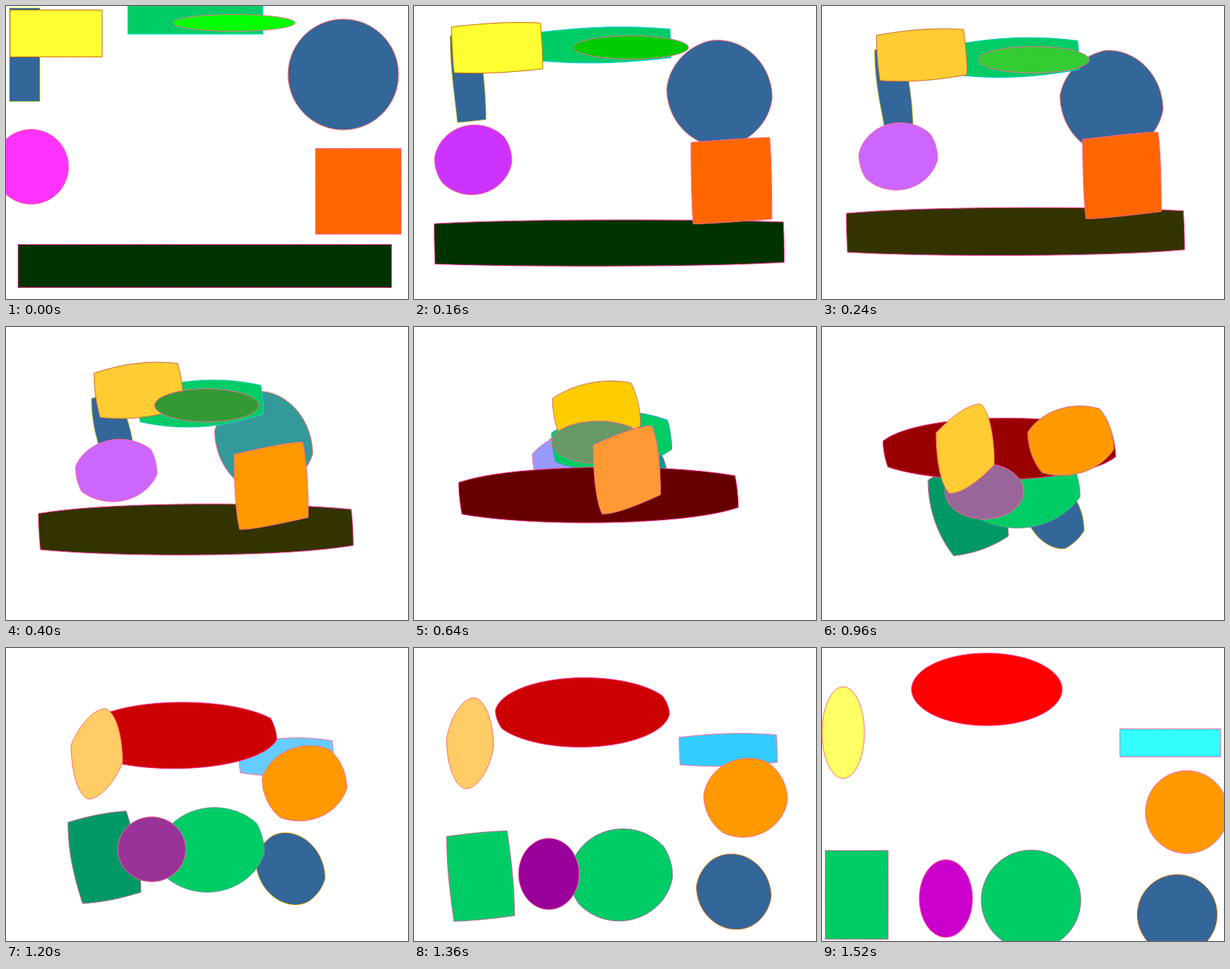
These frames come from a looping animation (550x400 px, 1.6 s). An HTML page with a canvas:

```html
<!DOCTYPE html>
<html lang="en">
<head>
<meta charset="utf-8">
<title>Shape morph</title>
<style>
  html, body { margin: 0; width: 100%; height: 100%; overflow: hidden; background: #fff; }
  canvas { display: block; }
</style>
</head>
<body>
<canvas id="stage" width="550" height="400"></canvas>
<script>
const ctx = document.getElementById('stage').getContext('2d');
const STEPS = 20, STEP_MS = 80, SIDE_POINTS = 40;

const rect = (cx, cy, rx, ry) => ({ cx, cy, rx, ry, isRect: true });
const oval = (cx, cy, rx, ry = rx) => ({ cx, cy, rx, ry });
const lerp = (a, b, t) => a + (b - a) * t;
const mix = (p, q, t) => [lerp(p[0], q[0], t), lerp(p[1], q[1], t)];

// Back to front: start, end, arc in degrees matched to a rectangle's right side,
// then fill and stroke colours at both ends.
const shapes = [
  [oval(461.5, 93.5, 75.5), rect(47.5, 337, 43, 60.5), 105, '369', '0c6', 'f66', 'c69'],
  [rect(25.5, 66.5, 21, 64), oval(486, 364, 54.5), 135, '369', '369', 'cf3', 'c60'],
  [oval(34.5, 219.5, 51), rect(476.5, 129.5, 69, 19), 39, 'f3f', '3ff', 'f69', 'f69'],
  [rect(259, 19, 92.5, 19.5), oval(286, 344, 68), 37, '0c6', '0c6', '0ff', '969'],
  [rect(272, 355, 255.5, 29.5), oval(225.5, 56.5, 103, 49.5), 26, '030', 'f00', 'f39', 'f39'],
  [rect(68.5, 37.5, 63, 32), oval(499, 224, 56.5), 63, 'ff3', 'f90', 'c60', 'f6c'],
  [oval(312, 23, 83.5, 11.5), oval(169.5, 342, 36.5, 53), 90, '0f0', 'c0c', 'f69', 'f69'],
  [rect(482, 253, 58.5, 58.5), oval(29, 115.5, 29, 62.5), 90, 'f60', 'ff6', 'f69', 'f66']
].map(([from, to, arc, ...colors]) => ({ points: pairOutlines(from, to, arc), colors }));

function ovalPoint(s, degrees) {
  const a = degrees * Math.PI / 180;
  return [s.cx + s.rx * Math.cos(a), s.cy + s.ry * Math.sin(a)];
}

// Point pairs along both outlines, clockwise from the left / top left corner.
function pairOutlines(from, to, arc) {
  const angles = [-180, -arc, 0, 180 - arc, 180];
  const corners = [[-1, -1], [1, -1], [1, 1], [-1, 1], [-1, -1]];
  const round = from.isRect ? to : from;
  const pairs = [];
  for (let side = 0; side < 4; side++) {
    const corner = (s, i) => [s.cx + s.rx * corners[i][0], s.cy + s.ry * corners[i][1]];
    const degrees = i => lerp(angles[side], angles[side + 1], i / SIDE_POINTS);
    const lengths = [0];
    for (let i = 1; i <= SIDE_POINTS; i++) {
      const [x0, y0] = ovalPoint(round, degrees(i - 1));
      const [x1, y1] = ovalPoint(round, degrees(i));
      lengths.push(lengths[i - 1] + Math.hypot(x1 - x0, y1 - y0));
    }
    for (let i = 0; i < SIDE_POINTS; i++) {
      const along = lengths[i] / lengths[SIDE_POINTS];
      pairs.push([from, to].map(s => s.isRect
        ? mix(corner(s, side), corner(s, side + 1), along)
        : ovalPoint(s, degrees(i))));
    }
  }
  return pairs;
}

// Blends two short hex colours and snaps each channel to the web palette.
function blend(a, b, t) {
  const channel = i => {
    const value = lerp(parseInt(a[i], 16), parseInt(b[i], 16), t) * 17;
    return '003336669999cccf'[value >> 4];
  };
  return '#' + channel(0) + channel(1) + channel(2);
}

function draw() {
  const t = Math.floor(performance.now() / STEP_MS) % STEPS / (STEPS - 1);
  ctx.fillStyle = '#fff';
  ctx.fillRect(0, 0, 550, 400);
  for (const { points, colors: [fill0, fill1, line0, line1] } of shapes) {
    ctx.beginPath();
    for (const [p, q] of points) ctx.lineTo(...mix(p, q, t));
    ctx.closePath();
    ctx.fillStyle = blend(fill0, fill1, t);
    ctx.strokeStyle = blend(line0, line1, t);
    ctx.fill();
    ctx.stroke();
  }
  requestAnimationFrame(draw);
}
draw();
</script>
</body>
</html>
```
